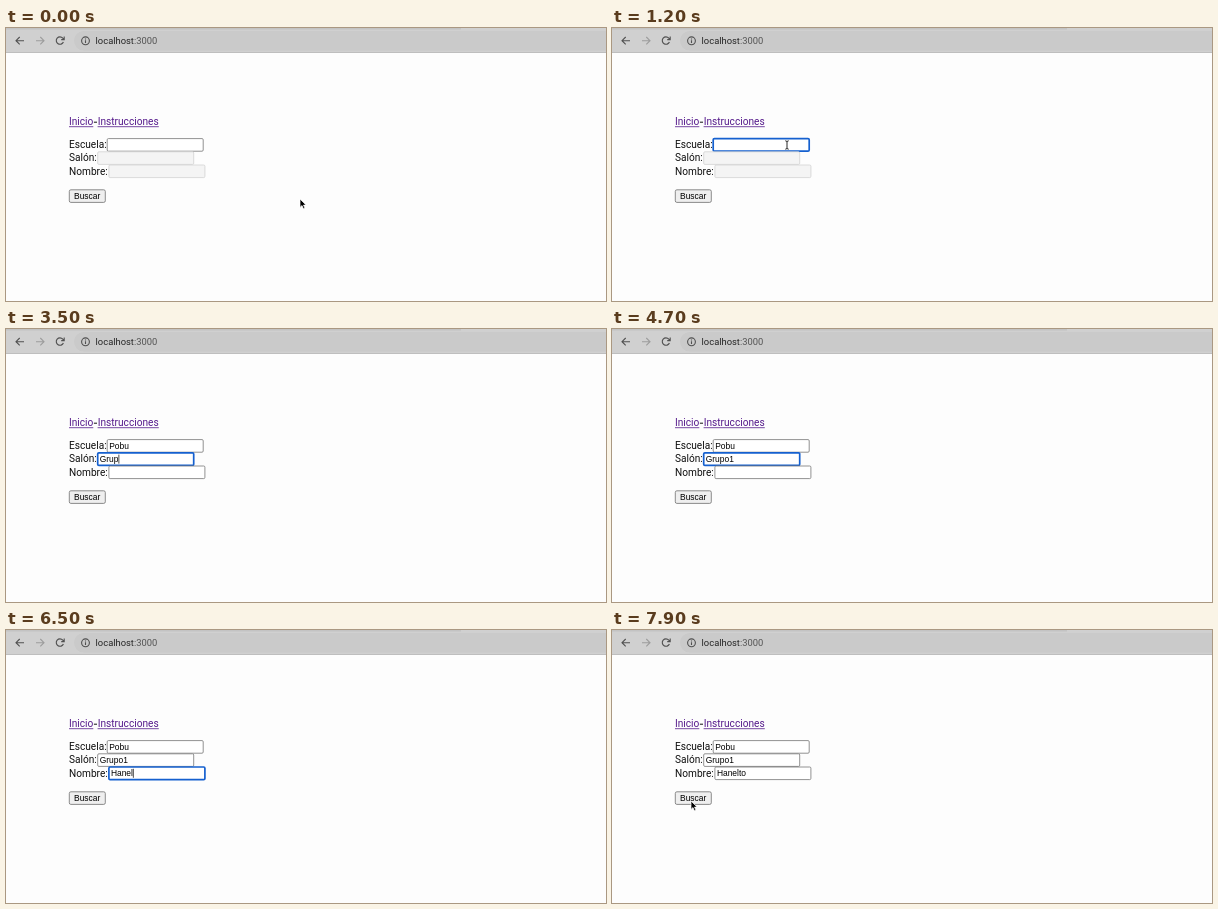
An HTML page for the animation above (8 s loop, 600 by 273 pixels).

```html
<!DOCTYPE html>
<html lang="es">
<head>
<meta charset="utf-8">
<title>Buscar</title>
<style>
  html, body { margin: 0; width: 100%; height: 100%; overflow: hidden; background: #fdfdfd; }
  svg { display: block; width: 600px; height: 273px; }
  text { white-space: pre; }
  .page { font: 10.14px Roboto, sans-serif; fill: #111; }
  .link { fill: #551a8b; }
  .control { font: 8.45px "Liberation Sans", Arial, sans-serif; fill: #000; }
  .url { font: 9.4px Roboto, sans-serif; fill: #252525; }
  .icon { fill: none; stroke: #505050; stroke-width: 1.1; }
  .box { fill: #fff; stroke: #767676; stroke-width: .8; }
  .disabled .box { fill: #f4f4f4; stroke: #d2d2d2; }
  .focused .box { stroke: #1560cf; stroke-width: 1.7; }
  .caret { stroke: #000; stroke-width: .7; }
</style>
</head>
<body>
<svg viewBox="0 0 600 273">
  <rect width="600" height="273" fill="#fdfdfd"/>
  <rect width="600" height="24.5" fill="#d0d0d0"/>
  <rect width="455" height="1.5" fill="#c3c3c3"/>
  <rect x="68" y="3" width="560" height="19.5" rx="9.75" fill="#cacaca"/>
  <rect y="24" width="600" height="1" fill="#bebebe"/>

  <path class="icon" d="M18 12.7H10M13.7 9L10 12.7L13.7 16.4"/>
  <path class="icon" style="stroke:#9c9c9c" d="M30 12.7H38M34.3 9L38 12.7L34.3 16.4"/>
  <path class="icon" d="M57.4 14A3.7 3.7 0 1 1 56.8 10.2L58 11.4M58.2 8.6V11.6H55.2"/>
  <circle class="icon" cx="79.5" cy="12.8" r="3.9" stroke-width=".9"/>
  <path class="icon" d="M79.5 12.2V15M79.5 10.4V11.4"/>
  <text class="url" x="89.6" y="16">localhost<tspan fill="#525252">:3000</tspan></text>

  <g class="page">
    <text class="link" x="63" y="97.2">Inicio</text>
    <path d="M63 98.7H87.3M91.6 98.7H152.8" stroke="#551a8b" stroke-width=".8"/>
    <path d="M87.9 94.2H91" stroke="#111"/>
    <text class="link" x="91.7" y="97.2">Instrucciones</text>
    <text x="63" y="120.2">Escuela:</text>
    <text x="63" y="133.3">Salón:</text>
    <text x="63" y="146.5">Nombre:</text>
  </g>

  <g id="fields"></g>

  <rect x="63.3" y="161.8" width="36" height="12.6" rx="1.6" fill="#efefef" stroke="#707070" stroke-width=".8"/>
  <text class="control" x="68" y="171.1">Buscar</text>

  <g id="pointer">
    <path id="arrow" d="M0 0V8.4L2 6.6L3.4 9.8L4.9 9.1L3.5 6.1H6.1Z" fill="#000" stroke="#fff" stroke-width=".7"/>
    <path id="beam" d="M-1.7 -4.2Q0 -4.2 0 -3.2Q0 -4.2 1.7 -4.2M0 -3.4V3.4M-1.7 4.2Q0 4.2 0 3.2Q0 4.2 1.7 4.2" fill="none" stroke="#111" stroke-width=".9"/>
  </g>
</svg>
<script>
const LOOP = 8000, STEP = 100, W = 96, H = 12.6;

// keys: the time at which each letter is typed
const fields = [
  { x: 101.2, y: 110.6, from: 700, to: 2100, enabled: 0, word: "Pobu", keys: [1300, 1600, 1800, 1900] },
  { x: 91.7, y: 123.8, from: 2100, to: 5000, enabled: 1300, word: "Grupo1", keys: [2800, 3100, 3200, 3500, 3600, 4200] },
  { x: 102.9, y: 137, from: 5000, to: 7900, enabled: 2800, word: "Hanelto", keys: [5800, 6100, 6200, 6300, 6500, 6600, 6700] }
];

// Pointer stops: time, x, y
const approach = [[0, 294, 171], [100, 285, 163], [300, 240, 126], [500, 197, 95], [700, 178, 115], [900, 175, 117]];
const leave = [[7300, 175, 117], [7400, 171, 123], [7600, 130, 160], [7700, 102, 175], [7800, 84, 176], [7900, 79, 171]];

const byId = id => document.getElementById(id);
const show = (node, on) => node.setAttribute("visibility", on ? "visible" : "hidden");

function add(parent, tag, attrs) {
  const node = document.createElementNS("http://www.w3.org/2000/svg", tag);
  for (const key in attrs) node.setAttribute(key, attrs[key]);
  return parent.appendChild(node);
}

for (const f of fields) {
  f.group = add(byId("fields"), "g", {});
  add(f.group, "rect", { class: "box", x: f.x, y: f.y, width: W, height: H, rx: 1.2 });
  f.text = add(f.group, "text", { class: "control", x: f.x + 2, y: f.y + 9.2 });
  f.caret = add(f.group, "path", { class: "caret" });
}

function along(stops, t) {
  const last = stops[stops.length - 1];
  const i = stops.findIndex(s => s[0] > t);
  if (i < 0) return last.slice(1);
  const [t0, x0, y0] = stops[i - 1], [t1, x1, y1] = stops[i];
  const k = (t - t0) / (t1 - t0);
  return [x0 + (x1 - x0) * k, y0 + (y1 - y0) * k];
}

function drawField(f, t) {
  const typed = f.keys.filter(k => k <= t);
  const focused = t >= f.from && t < f.to;
  const since = t - Math.max(f.from, ...typed);
  f.group.setAttribute("class", focused ? "focused" : t < f.enabled ? "disabled" : "");
  f.text.textContent = f.word.slice(0, typed.length);
  const x = f.x + 2.4 + (typed.length ? f.text.getComputedTextLength() : 0);
  f.caret.setAttribute("d", `M${x} ${f.y + 1.8}v9`);
  show(f.caret, focused && since % 1000 < 500);
}

function drawPointer(t) {
  const visible = t < 1300 || t >= 7300;
  const [x, y] = along(t < 1300 ? approach : leave, visible ? t : LOOP);
  const overField = fields.some(f => t >= f.enabled && x > f.x && x < f.x + W && y > f.y && y < f.y + H);
  byId("pointer").setAttribute("transform", `translate(${x} ${y})`);
  show(byId("arrow"), visible && !overField);
  show(byId("beam"), visible && overField);
}

const start = performance.now();
function frame() {
  const t = Math.floor((performance.now() - start) % LOOP / STEP) * STEP;
  fields.forEach(f => drawField(f, t));
  drawPointer(t);
  requestAnimationFrame(frame);
}
frame();
</script>
</body>
</html>
```
